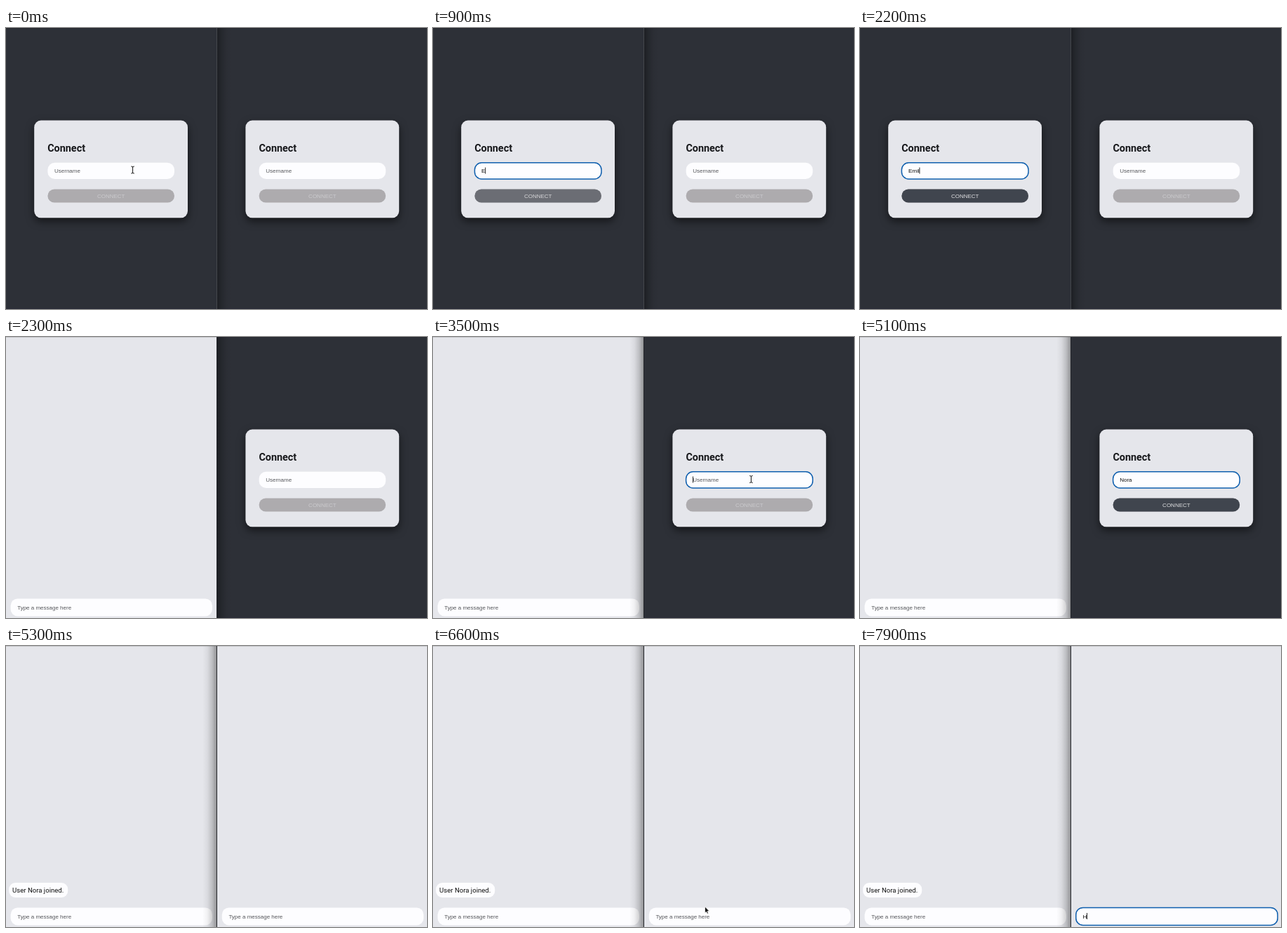
An HTML page that plays this animation: 600x400 px, repeating every 8 s.

```html
<!DOCTYPE html>
<html lang="en">
<head>
<meta charset="utf-8">
<title>Two chat windows</title>
<style>
  html, body { margin: 0; width: 100%; height: 100%; overflow: hidden; background: #2d3037; }
  svg { display: block; width: 600px; height: 400px; }
  text { font: 8px "Liberation Sans", Arial, sans-serif; fill: #111; white-space: pre; }
  .title { font: 700 14.4px Roboto, sans-serif; fill: #16171a; }
  .note { font: 9.6px Roboto, sans-serif; fill: #111; }
  .hint { fill: #55565a; }
  .label { text-anchor: middle; fill: #cbcacd; }
  .label.on { fill: #dedfe1; }
  .card { fill: #e5e6eb; filter: drop-shadow(0 5px 6px rgba(0, 0, 0, .55)); }
  .field { fill: #fdfdff; }
  .ring { fill: none; stroke: #0f5fae; stroke-width: 1.5; }
  .caret { fill: #111; }
</style>
</head>
<body>
<svg id="stage" viewBox="0 0 600 400">
  <defs>
    <linearGradient id="shade">
      <stop offset="0" stop-color="#000" stop-opacity=".36"/>
      <stop offset=".3" stop-color="#000" stop-opacity=".18"/>
      <stop offset=".65" stop-color="#000" stop-opacity=".05"/>
      <stop offset="1" stop-color="#000" stop-opacity="0"/>
    </linearGradient>
  </defs>
  <g id="panes"></g>
  <rect id="shadeRight" x="301" width="20" height="400" fill="url(#shade)"/>
  <rect id="shadeLeft" width="20" height="400" fill="url(#shade)" transform="translate(300) scale(-1 1)"/>
  <rect id="divider" x="300" width="1" height="400"/>
  <g id="beam" fill="none" stroke-linecap="round">
    <path d="M-1.8-5Q0-5 0-3.8Q0-5 1.8-5M0-4V4M-1.8 5Q0 5 0 3.8Q0 5 1.8 5" stroke="#111"/>
  </g>
  <path id="arrow" d="M0 0V9L2 7.2L3.4 10.2L4.9 9.5L3.6 6.6H6.4Z" fill="#111" stroke="#fff" stroke-width=".7"/>
</svg>
<script>
const LOOP = 8000, STEP = 100;
const $ = id => document.getElementById(id);

// A text field with its focus ring, hint, typed text and caret.
const field = (id, x, y, w, h, hint) => `
  <rect class="field" x="${x}" y="${y}" width="${w}" height="${h}" rx="10"/>
  <rect class="ring" id="${id}Ring" x="${x}" y="${y}" width="${w}" height="${h}" rx="10"/>
  <text class="hint" id="${id}Hint" x="${x + 9.6}" y="${y + h / 2 + 2.7}">${hint}</text>
  <text id="${id}Text" x="${x + 9.6}" y="${y + h / 2 + 2.7}"></text>
  <rect class="caret" id="${id}Caret" y="${y + h / 2 - 4.9}" width=".9" height="9"/>`;

const button = (fill, cls) => `
  <rect x="59.4" y="229.5" width="180.6" height="19" rx="9.5" fill="${fill}"/>
  <text class="label ${cls}" x="149.7" y="241.8">CONNECT</text>`;

const pane = (id, x, edge) => `
  <g transform="translate(${x})">
    <g id="${id}Login">
      <rect x="${edge}" width="300" height="400" fill="#2d3037"/>
      <rect x="${edge}" width="300" height="1" fill="#26282f"/>
      <rect x="${edge}" y="399" width="300" height="1" fill="#272935"/>
      <rect class="card" x="40.2" y="131.6" width="218.8" height="138.6" rx="9.6"/>
      <text class="title" x="59.2" y="176.2">Connect</text>
      ${field(id + "Name", 59.4, 191.8, 180.6, 23.2, "Username")}
      ${button("#adabae", "")}
      <g id="${id}Button">${button("#40454e", "on")}</g>
    </g>
    <g id="${id}Chat">
      <rect x="${edge}" width="300" height="400" fill="#e5e6eb"/>
      <rect x="${edge}" width="300" height="1" fill="#c6c7cb"/>
      <g id="${id}Note">
        <rect class="field" x="4.2" y="337" width="84" height="21" rx="9"/>
        <text class="note" x="9" y="350.9">User Nora joined.</text>
      </g>
      ${field(id + "Msg", 6.6, 372.4, 287.4, 25, "Type a message here")}
    </g>
  </g>`;

$("panes").innerHTML = pane("left", 0, 0) + pane("right", 301.2, -1.2);

const show = (id, on) => $(id).style.display = on ? "" : "none";
const passed = (times, t) => times.filter(s => s <= t).length;
const blink = (times, t) => passed(times, t) % 2 === 1;
const typed = (word, times, t) => word.slice(0, passed(times, t));
const mix = (a, b, k) => a + (b - a) * k;

function drawField(id, text, focused, caret) {
  const el = $(id + "Text"), bar = $(id + "Caret");
  el.textContent = text;
  show(id + "Hint", !text);
  show(id + "Ring", focused);
  show(id + "Caret", caret);
  const width = text ? el.getComputedTextLength() : 0;
  bar.setAttribute("x", +el.getAttribute("x") + width - .1);
}

function drawButton(id, start, t) {
  $(id).style.opacity = t < start ? 0 : t < start + STEP ? .6 : 1;
}

// Returns [shape, x, y], or nothing while the pointer is hidden.
function pointer(t) {
  if (t < 900) return ["beam", 180.6, 202];
  if (t < 2700) return;
  if (t < 3100) {
    const k = Math.min((t - 2700) / 200, 1);
    return ["arrow", mix(215.5, 443.5, k), mix(210.4, 216.4, k)];
  }
  if (t < 3200) return ["beam", 450, 207];
  if (t < 3900) return ["beam", 453.4, 202.5];
  if (t < 5800) return;
  if (t < 6700) {
    const p = (t - 5800) / 800, k = p * p * (3 - 2 * p);
    return ["arrow", mix(439.5, 387.5, k), mix(231.4, 371, k)];
  }
  if (t < 7800) return ["beam", 389, 381.7];
}

function draw(t) {
  const leftChat = t >= 2300, rightChat = t >= 5300, rightFront = t >= 3300;
  show("leftLogin", !leftChat);
  show("leftChat", leftChat);
  show("rightLogin", !rightChat);
  show("rightChat", rightChat);
  show("leftNote", rightChat);
  show("rightNote", false);

  drawField("leftName", typed("Emil", [900, 1000, 1100, 1200], t), t >= 200,
    blink([200, 700, 900, 1700, 2200], t));
  drawField("rightName", typed("Nora", [3900, 4300, 4400, 4600], t), t >= 3400,
    blink([3400, 5100], t));
  drawField("leftMsg", "", false, false);
  drawField("rightMsg", typed("H", [7800], t), t >= 6900,
    blink([6900, 7400, 7800], t));
  drawButton("leftButton", 900, t);
  drawButton("rightButton", 3900, t);

  show("shadeLeft", rightFront);
  show("shadeRight", !rightFront);
  $("divider").setAttribute("fill", leftChat ? "#24262b" : "#44474d");

  const [shape, x, y] = pointer(t) || [];
  for (const id of ["beam", "arrow"]) {
    show(id, id === shape);
    if (id === shape) $(id).setAttribute("transform", `translate(${x} ${y})`);
  }
}

let last = -1;
function tick() {
  const t = Math.floor(performance.now() % LOOP / STEP) * STEP;
  if (t !== last) draw(last = t);
  requestAnimationFrame(tick);
}
tick();
</script>
</body>
</html>
```
